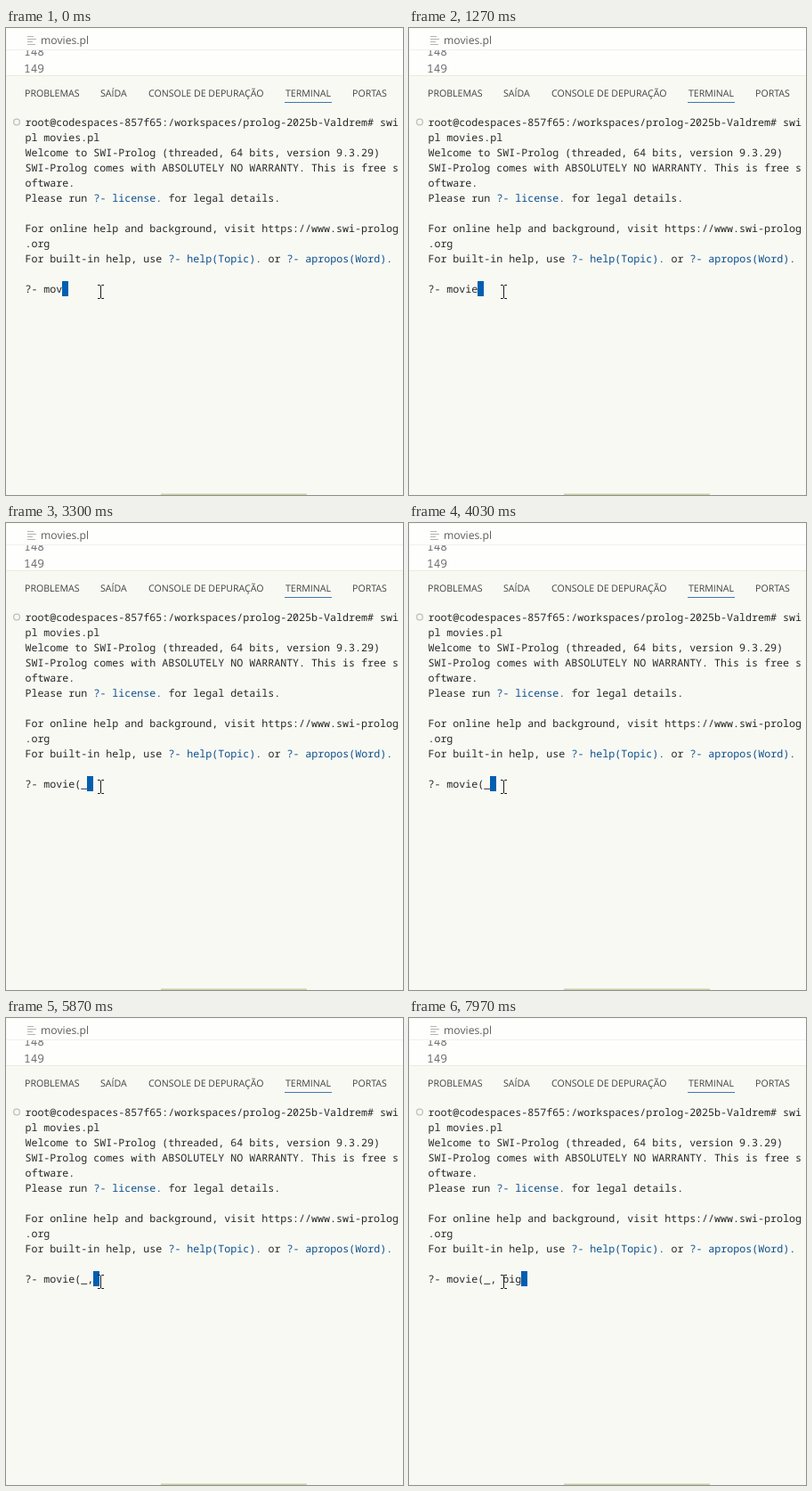
An HTML page that plays this animation: 446x524 px, repeating every 8 s.

```html
<!DOCTYPE html>
<html lang="pt">
<head>
<meta charset="utf-8">
<title>Terminal</title>
<style>
  html, body { margin: 0; width: 100%; height: 100%; overflow: hidden; background: #f9f9f4; }
  svg { display: block; width: 446px; height: 524px; }
  text { white-space: pre; text-rendering: geometricPrecision; }
  .mono { font-family: "Noto Sans Mono", monospace; font-size: 11.667px; fill: #262626; }
  .num { font-family: "Noto Sans Mono", monospace; font-size: 12.8px; fill: #6e7070; }
  .ui { font-family: "Open Sans", sans-serif; font-size: 10.6px; fill: #3f3f3f; }
  .tab { font-size: 12.2px; fill: #5c5c5c; }
  .code { fill: #0b4f8c; }
</style>
</head>
<body>
<svg viewBox="0 0 446 524">
  <defs>
    <clipPath id="editor"><rect y="25" width="446" height="28"/></clipPath>
  </defs>
  <rect width="446" height="524" fill="#f9f9f4"/>
  <rect x="1" y="1" width="445" height="52" fill="#fefefd"/>
  <path d="M0 24.5H446" stroke="#f0f0f4"/>
  <path d="M0 53.5H446" stroke="#ececd8"/>
  <path d="M24 9.5h7M24 12.5h10M24 15.5h6M24 18.5h9" stroke="#b4b4b4"/>
  <text class="ui tab" x="39" y="18">movies.pl</text>
  <g clip-path="url(#editor)">
    <text class="num" x="20" y="31">148</text>
    <text class="num" x="20" y="50">149</text>
  </g>
  <g id="tabs"></g>
  <path d="M313 83.5H366" stroke="#3c78b0"/>
  <circle cx="12" cy="105.5" r="3.4" fill="none" stroke="#c0c0b8" stroke-width="1.3"/>
  <g id="screen"></g>
  <rect x="174" y="522.5" width="164" height="1.5" fill="#cdcfa4"/>
  <rect id="caret" y="284" width="7" height="17" fill="#005fb0"/>
  <path d="M103 288.5h2.5l1 1l1 -1h2.5M106.5 289V303M103 303.5h2.5l1 -1l1 1h2.5"
        fill="none" stroke="#1c1c1c"/>
</svg>
<script>
const LOOP = 8000, LEFT = 21, TOP = 110, CELL = 7, ROW = 17;
const NS = "http://www.w3.org/2000/svg";
const byId = id => document.getElementById(id);

function addText(parent, cls, x, y, content) {
  const el = document.createElementNS(NS, "text");
  el.setAttribute("class", cls);
  el.setAttribute("x", x);
  el.setAttribute("y", y);
  el.textContent = content;
  parent.append(el);
  return el;
}

const tabs = [[21, "PROBLEMAS"], [106, "SAÍDA"], [160, "CONSOLE DE DEPURAÇÃO"],
              [314, "TERMINAL"], [389, "PORTAS"]];
for (const [x, label] of tabs) addText(byId("tabs"), "ui", x, 77, label);

// Text between backticks is shown in the code colour.
const lines = [
  "root@codespaces-857f65:/workspaces/prolog-2025b-Valdrem# swi",
  "pl movies.pl",
  "Welcome to SWI-Prolog (threaded, 64 bits, version 9.3.29)",
  "SWI-Prolog comes with ABSOLUTELY NO WARRANTY. This is free s",
  "oftware.",
  "Please run `?- license.` for legal details.",
  "",
  "For online help and background, visit https://www.swi-prolog",
  ".org",
  "For built-in help, use `?- help(Topic).` or `?- apropos(Word).`"
];
const addCells = (cls, col, row, content) =>
  addText(byId("screen"), cls, LEFT + 0.4 + col * CELL, TOP + row * ROW, content);

lines.forEach((line, row) => {
  let col = 0;
  line.split("`").forEach((part, i) => {
    addCells(i % 2 ? "mono code" : "mono", col, row, part);
    col += part.length;
  });
});

const query = "?- movie(_, big";
const START = 6;
const keyTimes = [130, 300, 2160, 3290, 5860, 6250, 6850, 7150, 7450];
const input = addCells("mono", 0, 11, "");

function draw(t) {
  const count = START + keyTimes.filter(k => t >= k).length;
  input.textContent = query.slice(0, count);
  byId("caret").setAttribute("x", LEFT + count * CELL);
}

const begin = performance.now();
function tick() {
  draw((performance.now() - begin) % LOOP);
  requestAnimationFrame(tick);
}
tick();
</script>
</body>
</html>
```
